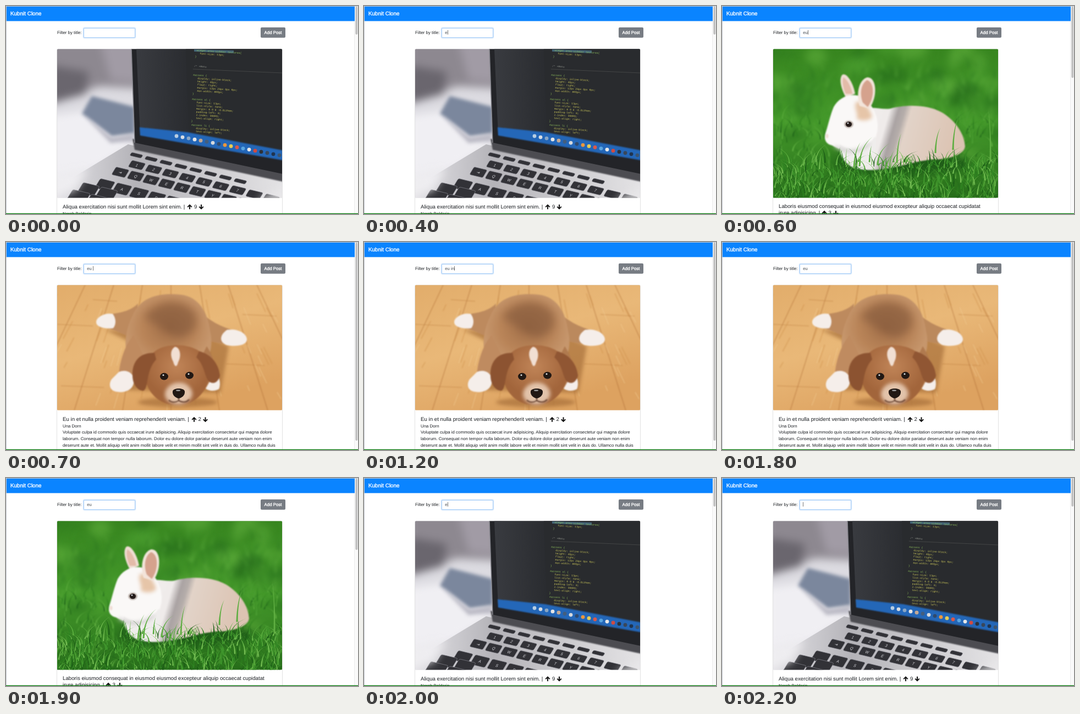
An HTML page that plays this animation: 640 by 379 pixels, repeating every 2300 ms.

```html
<!DOCTYPE html>
<html lang="en">
<head>
<meta charset="utf-8">
<title>Filter posts by title</title>
<style>
html, body { margin: 0; width: 100%; height: 100%; overflow: hidden; background: #fff; }
svg { position: absolute; left: 0; top: 0; display: block; }
text, .field { font-family: "Liberation Sans", Arial, sans-serif; text-rendering: geometricPrecision; white-space: pre; }
.body { font-size: 7.85px; fill: #1c1f23; }
.title { font-size: 9.7px; fill: #1c1f23; }
.light { fill: #fff; stroke: #fff; stroke-width: .35px; }
.arrow { fill: none; stroke: #111; stroke-width: 2px; }
.card { fill: none; stroke: #e2e2e2; }
.code { font: 4.7px "Liberation Mono", monospace; }
.key { font-size: 6.5px; fill: #d5d5da; text-anchor: middle; }
.soft { filter: blur(.8px); }
.softer { filter: blur(3px); }
.haze { filter: blur(8px); }
.post { display: none; }
[data-post=laptop] .laptop, [data-post=rabbit] .rabbit, [data-post=dog] .dog { display: block; }
.thumb { fill: #c1c1c1; height: 51px; }
[data-post=rabbit] .thumb { height: 130px; }
[data-post=dog] .thumb { height: 361px; }
.field {
  position: absolute; left: 141px; top: 39.5px; width: 94px; height: 18.5px; box-sizing: border-box;
  border: 1px solid #a6cdf8; border-radius: 2px; box-shadow: 0 0 0 1.3px #d5e7fb;
  padding-left: 5.2px; font-size: 7.85px; line-height: 16.5px; color: #495057; background: #fff;
}
.caret { display: inline-block; width: .6px; height: 8.5px; margin-left: .2px; vertical-align: -1.5px; background: #777; }
</style>
</head>
<body>
<svg id="stage" width="640" height="379" viewBox="0 0 640 379" data-post="laptop">
  <defs>
    <path id="arrow" class="arrow" d="M-3.8 .4L0 -3.4L3.8 .4M0 -3V4.2"/>
    <clipPath id="tall"><rect x="93" y="78.5" width="409" height="271" rx="1.5"/></clipPath>
    <clipPath id="short"><rect x="93" y="78.5" width="409" height="228" rx="1.5"/></clipPath>
    <linearGradient id="metal"><stop offset="0" stop-color="#e3e2e6"/><stop offset=".35" stop-color="#b4b3b8"/><stop offset="1" stop-color="#e4e3e5"/></linearGradient>
    <linearGradient id="screen"><stop offset="0" stop-color="#393b40"/><stop offset=".35" stop-color="#2a2c30"/><stop offset="1" stop-color="#34363a"/></linearGradient>
    <linearGradient id="lawn" x2="0" y2="1"><stop offset="0" stop-color="#37851f"/><stop offset=".5" stop-color="#459a2b"/><stop offset="1" stop-color="#276d1a"/></linearGradient>
    <linearGradient id="coat" y2=".15"><stop offset="0" stop-color="#f4f1f0"/><stop offset=".4" stop-color="#efebea"/><stop offset=".47" stop-color="#aaa3a3"/><stop offset=".52" stop-color="#b5adaa"/><stop offset=".57" stop-color="#e2d3c8"/><stop offset="1" stop-color="#dcc3b2"/></linearGradient>
    <linearGradient id="floor" x2=".5" y2="1"><stop offset="0" stop-color="#e2ad6b"/><stop offset=".5" stop-color="#e9b878"/><stop offset="1" stop-color="#dda260"/></linearGradient>
    <radialGradient id="fur" cy=".45"><stop offset="0" stop-color="#a37049"/><stop offset=".6" stop-color="#b98458"/><stop offset="1" stop-color="#c6966c"/></radialGradient>
    <radialGradient id="face" cy=".35"><stop offset="0" stop-color="#c08457"/><stop offset="1" stop-color="#a2653b"/></radialGradient>
  </defs>

  <rect x="634" width="6" height="379" fill="#fafafa"/>
  <path d="M633.5 28V379" stroke="#ebebeb"/>
  <rect class="thumb" x="635.3" y="1" width="4" rx="2"/>
  <rect width="634" height="27.5" fill="#0a84ff"/>
  <path d="M0 .5H640M.5 0V379" stroke="#c4c9cf"/>
  <text class="light" x="8" y="17.3" font-size="9.9">Kubnit Clone</text>
  <text class="body" x="93" y="51">Filter by title:</text>
  <rect x="463" y="39" width="45" height="18.7" rx="2" fill="#777c83"/>
  <text class="light" x="469.6" y="51.2" font-size="7.85">Add Post</text>

  <g class="post laptop">
    <path class="card" d="M92.5 390V80.5q0-2 2-2H500.5q2 0 2 2V390"/>
    <g clip-path="url(#tall)">
      <rect x="93" y="78" width="410" height="272" fill="#dcdbe1"/>
      <g class="haze">
        <path d="M80 60H250V150L170 146L80 176Z" fill="#8d8890"/>
        <path d="M80 108L150 120L145 160L80 178Z" fill="#6a666e"/>
        <path d="M170 60H240V140L190 135Z" fill="#a19ba5"/>
        <path d="M80 200L150 190L235 250L160 300L80 320Z" fill="#f0eff3"/>
      </g>
      <path class="softer" d="M156 164L234 184V232L192 238L138 196Z" fill="#7b879d"/>
      <path class="softer" d="M140 198L192 239L232 233V246L190 250Z" fill="#bcbbc6"/>
      <path d="M222 252L502 316V350H93V330Z" fill="url(#metal)"/>
      <path class="soft" d="M230 242L512 300V322L234 262Z" fill="#4c4c51"/>
      <path d="M228 78H503V306L234 249Z" fill="#232428"/>
      <path d="M237 78H503V278L244 235Z" fill="url(#screen)"/>
      <path d="M327 78H503V270L333 240Z" fill="#292b2e"/>
      <path class="soft" d="M243 221L330 230L503 263V281L244 236Z" fill="#2467b8"/>
      <path d="M228 78L234 249" stroke="#85858c" stroke-width="1.5"/>
      <path d="M342 79L414 81V86L342 83Z" fill="#426275"/>
      <path d="M340 115L503 122" stroke="#565857" stroke-width=".6"/>
      <g id="code"></g>
      <g id="dock"></g>
      <g id="keys"></g>
      <path class="haze" d="M465 349L520 325V370H455Z" fill="#e9e8ea" opacity=".8"/>
      <path class="haze" d="M80 305L150 296L125 335L80 350Z" fill="#eeedf0"/>
    </g>
    <text class="title" x="103" y="368.5">Aliqua exercitation nisi sunt mollit Lorem sint enim. |</text>
    <use href="#arrow" x="334" y="366"/><text class="title" x="342" y="368.5">9</text>
    <use href="#arrow" transform="translate(355 366) rotate(180)"/>
    <text class="body" x="103" y="380.5">Norah Belderin</text>
  </g>

  <g class="post rabbit">
    <path class="card" d="M92.5 390V80.5q0-2 2-2H500.5q2 0 2 2V390"/>
    <g clip-path="url(#tall)">
      <rect x="93" y="78" width="410" height="272" fill="url(#lawn)"/>
      <g id="blobs" class="haze"></g>
      <g id="farGrass" class="softer"></g>
      <g id="backGrass" class="soft"></g>
      <ellipse class="haze" cx="325" cy="287" rx="125" ry="20" fill="#1f5c18"/>
      <g class="soft">
        <path d="M246 190C270 180 290 190 306 187C330 180 372 178 400 194C426 210 441 234 442 256C440 272 408 280 380 280C335 285 300 303 255 298C225 293 210 270 214 240Z" fill="url(#coat)"/>
        <path d="M225 166C216 150 212 132 219 125C227 121 239 141 242 160Z" fill="#f0ddd4"/>
        <path d="M225 160C219 147 218 134 221 130C228 134 235 148 237 160Z" fill="#e3bba9"/>
        <path d="M203 184C213 166 236 155 258 168C285 188 292 230 270 254C246 272 216 264 200 254C186 251 185 239 189 229C193 217 197 198 203 184Z" fill="#faf8f7"/>
        <path d="M214 252C240 270 262 262 278 238C285 268 270 292 245 297C225 290 214 276 214 252Z" fill="#efedec"/>
        <path class="softer" d="M243 176C252 170 268 182 273 202C268 210 252 210 245 205C248 195 240 188 243 176Z" fill="#e6c5a8"/>
        <path d="M250 182C243 157 250 134 264 130C281 129 284 164 268 187Z" fill="#f3e4da"/>
        <path d="M256 176C249 158 254 140 264 135C276 139 279 164 265 184Z" fill="#d5a28d"/>
        <path class="softer" d="M205 256C225 268 250 268 268 250" fill="none" stroke="#c9c7c6" stroke-width="4"/>
        <ellipse cx="191" cy="237" rx="2.5" ry="4" fill="#f0ddd5"/>
      </g>
      <ellipse class="soft" cx="230.5" cy="215.5" rx="8" ry="6.5" fill="#a69a92"/>
      <ellipse cx="230.5" cy="215.5" rx="5.5" ry="4.8" fill="#241b19"/>
      <circle cx="229" cy="213.5" r="1.3" fill="#e8eef2"/>
      <g id="frontGrass"></g>
    </g>
    <text class="title" x="103" y="368">Laboris eiusmod consequat in eiusmod eiusmod excepteur aliquip occaecat cupidatat</text>
    <text class="title" x="103" y="380">irure adipisicing. |</text>
    <use href="#arrow" x="186" y="377.5"/><text class="title" x="193.5" y="380">3</text>
    <use href="#arrow" transform="translate(207 377.5) rotate(180)"/>
  </g>

  <g class="post dog">
    <path class="card" d="M92.5 390V80.5q0-2 2-2H500.5q2 0 2 2V390"/>
    <g clip-path="url(#short)">
      <rect x="93" y="78" width="410" height="229" fill="url(#floor)"/>
      <g id="planks" class="soft"></g>
      <g class="softer" fill="#a36c38" opacity=".65">
        <path d="M180 160L225 182L218 270L390 275L405 190L365 170Z"/>
        <ellipse cx="312" cy="292" rx="72" ry="9"/>
      </g>
      <g class="soft">
        <path d="M240 112C226 128 198 130 181 133L178 155C199 161 216 168 232 178Z" fill="#bd8a5e"/>
        <path d="M350 124C368 142 390 156 420 162L414 187C385 186 365 180 345 170Z" fill="#bb895d"/>
        <path d="M231 132C246 98 283 92 318 96C352 100 367 130 371 162C377 187 373 218 350 227L239 234C218 218 207 180 231 132Z" fill="url(#fur)"/>
        <path class="haze" d="M250 137C275 103 322 101 344 129C354 156 335 174 310 174C286 160 270 150 250 137Z" fill="#80563a" opacity=".6"/>
        <path d="M232 170C215 189 207 218 205 242L233 255L252 210Z" fill="#bf8b60"/>
        <path d="M365 190C380 214 383 235 387 252L365 264L350 220Z" fill="#b07a4f"/>
        <g fill="#f5eeea">
          <path d="M194 131C180 128 164 137 164 146C164 155 180 159 195 157C201 149 200 139 194 131Z"/>
          <path d="M402 160C421 157 438 166 438 178C437 189 417 191 402 188C389 184 386 171 402 160Z"/>
          <path d="M205 237C218 231 232 238 232 251C235 266 219 276 203 273C188 272 186 259 192 250Z"/>
          <path d="M379 239C389 243 391 260 387 268C379 273 367 271 363 267Z"/>
        </g>
        <path d="M271 199C291 183 336 185 354 201C374 222 374 252 359 272C345 292 327 298 309 297C286 297 267 284 258 264C246 238 251 214 271 199Z" fill="url(#face)"/>
        <path d="M270 202C243 201 229 218 230 243C230 259 239 271 250 271C260 266 253 236 273 214Z" fill="#8c5331"/>
        <path d="M351 199C372 204 387 221 389 244C385 257 377 259 370 255C361 248 362 225 346 210Z" fill="#905633"/>
        <path d="M307 191C316 191 320 207 313 219C311 228 307 229 304 218C298 207 299 196 307 191Z" fill="#f1dfd3"/>
        <path class="softer" d="M294 265C305 253 325 253 334 265C346 278 334 294 315 296C295 296 281 281 294 265Z" fill="#e2c3aa"/>
        <path d="M314 281V289M314 289Q304 295 296 288M314 289Q325 295 333 287" fill="none" stroke="#64402f" stroke-width="2"/>
      </g>
      <g fill="#211814">
        <ellipse cx="287.5" cy="245" rx="7.5" ry="6.5"/>
        <ellipse cx="333.5" cy="243" rx="7.5" ry="6.5"/>
        <path d="M303 272C304 266 323 265 325 272C326 280 319 284 314 285C308 284 302 279 303 272Z"/>
      </g>
      <g fill="#d9e0e4"><circle cx="286" cy="242.5" r="1.5"/><circle cx="332" cy="240.5" r="1.5"/><ellipse cx="313" cy="270.5" rx="4" ry="1.2" opacity=".7"/></g>
    </g>
    <text class="title" x="103" y="326">Eu in et nulla proident veniam reprehenderit veniam. |</text>
    <use href="#arrow" x="342" y="323.5"/><text class="title" x="349.5" y="326">2</text>
    <use href="#arrow" transform="translate(362.5 323.5) rotate(180)"/>
    <text class="body" x="103" y="337.8">Una Dorn</text>
    <text class="body" x="103" y="349.3">Voluptate culpa id commodo quis occaecat irure adipisicing. Aliquip exercitation consectetur qui magna dolore</text>
    <text class="body" x="103" y="361">laborum. Consequat non tempor nulla laborum. Dolor eu dolore dolor pariatur deserunt aute veniam non enim</text>
    <text class="body" x="103" y="372.8">deserunt aute et. Mollit aliquip velit anim mollit labore velit et minim mollit sint velit in duis do. Ullamco nulla duis</text>
  </g>

  <rect y="377.7" width="640" height="1.3" fill="#0b7a10"/>
</svg>
<div class="field"><span id="query"></span><i class="caret" id="caret"></i></div>

<script>
const $ = id => document.getElementById(id);

function add(parent, tag, attrs, text) {
  const el = document.createElementNS("http://www.w3.org/2000/svg", tag);
  for (const name in attrs) el.setAttribute(name, attrs[name]);
  if (text) el.textContent = text;
  $(parent).append(el);
}

function seeded(seed) {
  return () => (seed = (seed * 16807) % 2147483647) / 2147483647;
}

function drawCode() {
  const blocks = [
    [344, 82, [".widget-area-sidebar textarea{", "   font-size: 13px;", "}"]],
    [342, 111, ["/* =Menu"]],
    [340, 127, ["#access {", "   display: inline-block;", "   height: 40px;", "   float: right;", "   margin: 12px 20px 0px 0px;", "   max-width: 800px;", "}"]],
    [338, 171, ["#access ul {", "   font-size: 13px;", "   list-style: none;", "   margin: 0 0 0 -0.8125em;", "   padding-left: 0;", "   z-index: 99999;", "   text-align: right;", "}"]],
    [337, 218, ["#access li {", "   display: inline-block;", "   text-align: left;"]]
  ];
  for (const [x, y, lines] of blocks) lines.forEach((line, i) => {
    const fill = line[0] === "/" ? "#8f928c" : line[0] === " " ? "#c9c45a" : "#8fbf5c";
    add("code", "text", { class: "code", fill, transform: `translate(${x - i * .2} ${y + i * 5.7}) rotate(3.5)` }, line);
  });
}

function drawDock() {
  const tints = ["#b7cde2", "#d7dce2", "#8aa6c4", "#e6e6e6", "#c3a995", "#435e7e", "#d6d9dd", "#304a6c", "#e9973d", "#e5cb55", "#d9594a", "#5aa5e0", "#e8e8e8", "#cf4b43", "#2d3138", "#39475a", "#1f3450", "#3d556f"];
  tints.forEach((fill, i) => add("dock", "circle", { cx: 310 + i * 11, cy: 237 + i * 2.05, r: 3.4, fill }));
}

function drawKeys() {
  const rows = [
    // x, y, step, width, height, count, labels
    [237, 272, 27, 21, 6, 8, ""],
    [238, 290, 30.5, 25, 12, 9, "1234567"],
    [208, 303, 28, 24, 14, 9, "⇥QWERTY"],
    [180, 326, 31, 27, 17, 7, " ASDF"],
    [150, 334, 33, 30, 18, 2, ""],
    [132, 347, 34, 32, 18, 4, ""]
  ];
  for (const [x, y, step, w, h, count, labels] of rows) {
    for (let i = 0; i < count; i++) {
      const transform = `matrix(1 .24 -.6 1 ${x + i * step} ${y + i * step * .25})`;
      add("keys", "rect", { x: -w / 2, y: -h / 2, width: w, height: h, rx: 2.5, fill: "#323237", stroke: "#828289", "stroke-width": .6, transform });
      if (labels[i]) add("keys", "text", { class: "key", y: 2.5, transform }, labels[i]);
    }
  }
}

function drawBlobs() {
  const rnd = seeded(11), tints = ["#23691a", "#5fae3c", "#2f7c20", "#4b9e30"];
  for (let i = 0; i < 70; i++) {
    add("blobs", "ellipse", { cx: 90 + rnd() * 415, cy: 75 + rnd() * 200, rx: 8 + rnd() * 22, ry: 6 + rnd() * 14, fill: tints[i % 4], opacity: .6 });
  }
}

function blade(x, y, tipX, tipY, width) {
  const midY = (y + tipY * 2) / 3;
  return `M${x - width} ${y}Q${x} ${midY} ${tipX} ${tipY}Q${x + width} ${midY} ${x + width} ${y}Z`;
}

function drawGrass(parent, count, top, bottom, reach, tints, seed) {
  const rnd = seeded(seed);
  const paths = tints.map(() => "");
  for (let i = 0; i < count; i++) {
    const x = 88 + rnd() * 420, y = top + rnd() * (bottom - top);
    const lean = (rnd() - .5) * reach * 1.7, h = reach * (.25 + rnd() * .75);
    paths[i % tints.length] += blade(x, y, x + lean, y - h, .7 + rnd() * .8);
  }
  paths.forEach((d, i) => add(parent, "path", { d, fill: tints[i] }));
}

function drawTallBlades() {
  const stems = [[488, 282, 484, 188], [420, 262, 430, 203], [388, 268, 397, 222], [250, 292, 274, 238], [283, 290, 305, 250], [318, 286, 326, 232], [208, 290, 220, 262], [240, 296, 252, 248]];
  const d = stems.map(([x, y, tipX, tipY]) => blade(x, y, tipX, tipY, 1.6)).join("");
  add("frontGrass", "path", { d, fill: "#5fae42" });
}

function drawPlanks() {
  const line = (x1, y1, x2, y2, stroke, width) =>
    add("planks", "path", { d: `M${x1} ${y1}L${x2} ${y2}`, stroke, "stroke-width": width, opacity: .5 });
  for (let i = -4; i <= 4; i++) line(300 + i * 52, 78, 300 + i * 88, 307, "#a8662d", 1.2);
  for (const [x, y, w] of [[93, 150, 65], [430, 132, 62], [100, 262, 78], [400, 222, 70], [158, 105, 44]]) line(x, y, x + w, y + 3, "#b67638", 1);
  const rnd = seeded(31);
  for (let i = 0; i < 60; i++) {
    const x = 93 + rnd() * 410, y = 78 + rnd() * 220, h = 10 + rnd() * 25;
    line(x, y, x + (x - 300) * h * .003, y + h, i % 2 ? "#f1cb92" : "#cf914c", 1.6);
  }
}

drawCode();
drawDock();
drawKeys();
drawPlanks();
drawBlobs();
drawGrass("farGrass", 220, 110, 240, 40, ["#2b7620", "#5cab3c", "#3c8f28"], 5);
drawGrass("backGrass", 420, 205, 345, 32, ["#2f8020", "#5fae40", "#256d1c", "#4a9c31"], 7);
drawGrass("frontGrass", 620, 284, 372, 34, ["#2f8422", "#55a93a", "#1d5f17", "#71bb50", "#3f952c"], 19);
drawTallBlades();

const LOOP = 2300;
const keystrokes = [
  // time, query, caret
  [0, "", false],
  [100, "", true],
  [400, "e", true],
  [600, "eu", true],
  [700, "eu ", true],
  [800, "eu i", true],
  [900, "eu in", true],
  [1700, "eu i", true],
  [1800, "eu ", false],
  [1900, "eu", false],
  [2000, "e", true],
  [2100, "", true]
];

// The first post whose title contains the query.
function firstMatch(query) {
  if (query.startsWith("eu ")) return "dog";
  return query === "eu" ? "rabbit" : "laptop";
}

const start = performance.now();

function render() {
  const t = (performance.now() - start) % LOOP;
  const [, query, caret] = keystrokes.findLast(([time]) => time <= t);
  $("query").textContent = query;
  $("stage").dataset.post = firstMatch(query);
  $("caret").style.visibility = caret ? "visible" : "hidden";
  requestAnimationFrame(render);
}
render();
</script>
</body>
</html>
```
